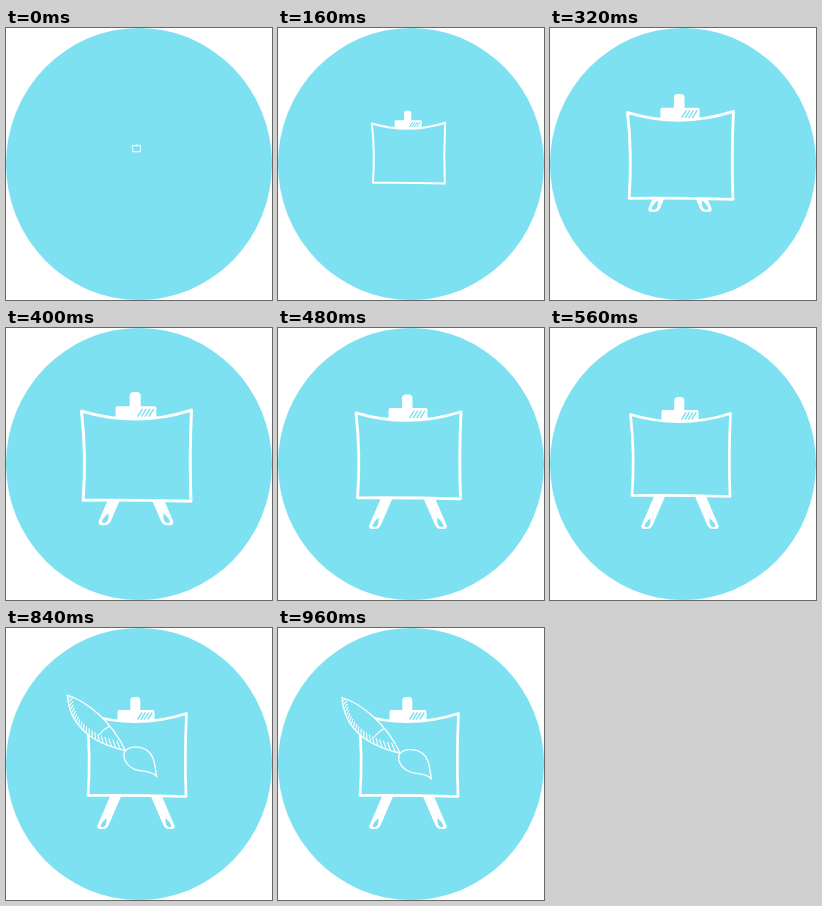
Write an HTML page with a canvas that moves like this. It is 266 by 272 pixels and loops after 1.8 s.

```html
<!DOCTYPE html>
<html lang="en">
<head>
<meta charset="utf-8">
<title>Easel</title>
<style>
  html, body { margin: 0; width: 100%; height: 100%; overflow: hidden; background: #fff; }
  canvas { display: block; }
</style>
</head>
<body>
<canvas id="stage" width="266" height="272"></canvas>
<script>
const ctx = document.getElementById('stage').getContext('2d');
const BLUE = '#7de1f1', WHITE = '#fff';
const LOOP = 1800, STEP = 40;

const clamp = x => Math.max(0, Math.min(1, x));
const span = (t, a, b) => clamp((t - a) / (b - a));
const outQuad = x => 1 - (1 - x) ** 2;
const inOutSine = x => (1 - Math.cos(Math.PI * x)) / 2;
const inOutCubic = x => x < 0.5 ? 4 * x ** 3 : 1 - 4 * (1 - x) ** 3;

const board = new Path2D('M80.5 86.5Q131 101.5 180.5 85.5Q178.5 128 180 168.5Q130 167 82 167.5Q85 126 80.5 86.5Z');
const handle = new Path2D('M64 69.5C82 75 108 95 122 125C86 117 66 98 64 69.5Z');
const bristles = new Path2D('M121 127C124 121 136 119.5 144 125C152 131 151 140 153.5 151C147 144 139 147 131 143.5C123 140 119.5 133 121 127Z');

function boardScale(t) {
  return t < 400
    ? 0.08 + 1.02 * outQuad(t / 400)
    : 1.1 - 0.1 * inOutSine(span(t, 400, 560));
}

function bezier(a, b, c, d, u) {
  const v = 1 - u;
  return a * v ** 3 + 3 * b * v * v * u + 3 * c * v * u * u + d * u ** 3;
}

function line(x1, y1, x2, y2) {
  ctx.beginPath();
  ctx.moveTo(x1, y1);
  ctx.lineTo(x2, y2);
  ctx.stroke();
}

function outline(path, width) {
  ctx.fillStyle = BLUE;
  ctx.strokeStyle = WHITE;
  ctx.lineWidth = width;
  ctx.fill(path);
  ctx.stroke(path);
}

function leg(x, side, lift) {
  ctx.save();
  ctx.translate(x - side * lift * 0.42, 201 - lift);
  ctx.transform(1, 0, side * 0.43, 1, 0, 0);
  ctx.fillStyle = WHITE;
  ctx.beginPath();
  ctx.roundRect(-5.5, -42, 11, 42, [0, 0, 4, 4]);
  ctx.fill();
  ctx.fillStyle = BLUE;
  ctx.beginPath();
  ctx.moveTo(0, -11);
  ctx.bezierCurveTo(4, -4, 2.5, -2, 0, -2);
  ctx.bezierCurveTo(-2.5, -2, -4, -4, 0, -11);
  ctx.fill();
  ctx.restore();
}

function clip() {
  ctx.fillStyle = WHITE;
  ctx.beginPath();
  ctx.roundRect(124.3, 69, 10, 16, 3.5);
  ctx.roundRect(111.5, 82, 37, 12, 1.5);
  ctx.fill();
  ctx.strokeStyle = BLUE;
  ctx.lineWidth = 1.4;
  for (let i = 0; i < 4; i++) {
    const x = 131.5 + i * 3.4;
    line(x, 91.5, x + 4.5, 84.5);
  }
}

function easel(t) {
  const s = boardScale(t);
  const lift = 45 * (1 - span(t, 180, 560)) ** 2 + 3 * Math.sin(Math.PI * span(t, 180, 560));
  ctx.save();
  ctx.translate(130.5, 120);
  ctx.scale(s, s);
  ctx.translate(-130.5, -120);
  if (t > 180) {
    leg(95.5, -1, lift);
    leg(164.5, 1, lift);
  }
  clip();
  outline(board, Math.max(2.7, 1 / s));
  ctx.restore();
}

function brush(t) {
  const away = 1 - inOutCubic(span(t, 560, 960));
  ctx.save();
  ctx.globalAlpha = span(t, 560, 680);
  ctx.translate(-25.2 * away, -22.8 * away);
  outline(handle, 1.3);
  ctx.save();
  ctx.clip(handle);
  ctx.lineWidth = 1.1;
  for (let i = 1; i < 22; i++) {
    const u = i / 22;
    const x = bezier(64, 66, 86, 122, u);
    const y = bezier(69.5, 98, 117, 125, u);
    line(x, y, x + 5 - 9 * u, y - 4 - 5 * u);
  }
  ctx.beginPath();
  ctx.moveTo(96, 109);
  ctx.quadraticCurveTo(101, 103, 108, 99.5);
  ctx.stroke();
  ctx.restore();
  outline(bristles, 1.3);
  ctx.restore();
}

function draw(now) {
  const t = Math.floor((now % LOOP) / STEP) * STEP;
  ctx.fillStyle = WHITE;
  ctx.fillRect(0, 0, 266, 272);
  ctx.fillStyle = BLUE;
  ctx.beginPath();
  ctx.ellipse(133, 136, 133, 136, 0, 0, 2 * Math.PI);
  ctx.fill();
  ctx.lineJoin = 'round';
  easel(t);
  if (t > 560) brush(t);
}

const start = performance.now();
function frame() {
  draw(performance.now() - start);
  requestAnimationFrame(frame);
}
frame();
</script>
</body>
</html>
```
